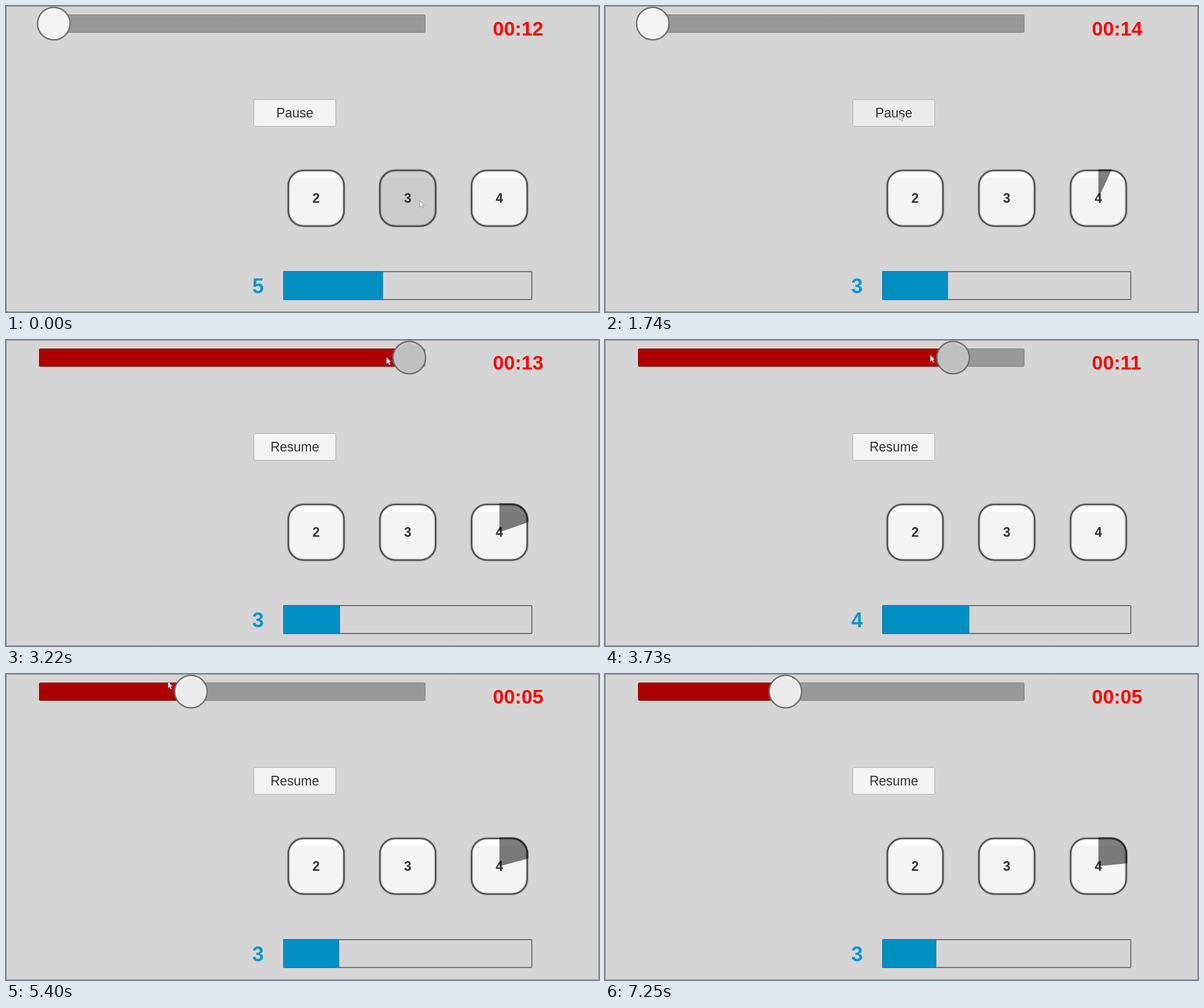
An HTML page with a canvas for the animation above (7530 ms loop, 1042 by 538 pixels).

```html
<!DOCTYPE html>
<html lang="en">
<head>
<meta charset="utf-8">
<title>Rewind slider</title>
<style>
html, body { margin: 0; width: 100%; height: 100%; overflow: hidden; background: #d5d5d5; }
canvas { display: block; }
</style>
</head>
<body>
<canvas id="stage" width="1042" height="538"></canvas>
<script>
const ctx = document.getElementById('stage').getContext('2d');
const LOOP = 7530, PAUSE_AT = 1840, GRAB_AT = 2700, DROP_AT = 5400, LEAVE_AT = 7250;
const START = 12.56, END = START + PAUSE_AT / 1000;   // game clock, seconds
const MIN_X = 84, MAX_X = 752;                        // travel of the slider handle
const FACE = '#f4f4f4', HOVER = '#ebebeb', PRESSED = '#c0c0c0', INK = '#323232';

const clamp = (v, lo, hi) => Math.min(hi, Math.max(lo, v));

function ease(t, from, to) {
  const k = clamp((t - from) / (to - from), 0, 1);
  return k * k * (3 - 2 * k);
}

// Slightly slowing drag to the left
function dragX(t) {
  const u = (t - 4430) / 1000;
  return clamp(486 - 174 * u + 8.4 * u * u, 317, MAX_X);
}

// Mana refills steadily; two cards are played on the way
const manaAt = s => 0.61 * s - (s >= 10.6 ? 2 : 0) - (s >= 12.7 ? 3 : 0);

function pointerAt(t) {
  let x = 727, y = 342;
  const moveTo = (tx, ty, from, to) => {
    const k = ease(t, from, to);
    x += (tx - x) * k;
    y += (ty - y) * k;
  };
  moveTo(517, 189, 500, 1600);
  moveTo(743, 19, 2000, 2560);
  moveTo(dragX(t) - 40, 21 - (Math.min(t, DROP_AT) - 4430) / 130, GRAB_AT, 3100);
  moveTo(203, 16, DROP_AT, 6120);
  moveTo(1000, 530, 6300, LEAVE_AT);
  return [x, y];
}

function box(x, y, w, h, r, fill, stroke, line = 1) {
  ctx.beginPath();
  ctx.roundRect(x, y, w, h, r);
  if (fill) { ctx.fillStyle = fill; ctx.fill(); }
  if (stroke) { ctx.strokeStyle = stroke; ctx.lineWidth = line; ctx.stroke(); }
}

function disc(x, y, r, fill, stroke, line) {
  box(x - r, y - r, 2 * r, 2 * r, r, fill, stroke, line);
}

function label(text, x, y, size, color, weight = 'bold', align = 'center') {
  ctx.font = `${weight} ${size}px "Liberation Sans", Arial, sans-serif`;
  ctx.textAlign = align;
  ctx.fillStyle = color;
  ctx.fillText(text, x, y);
}

function card(cost, x, face, mana) {
  const y = 287, size = 102, cx = x + size / 2, cy = y + size / 2;
  ctx.save();
  box(x, y, size, size, 29, face === PRESSED ? '#d1d1d1' : '#fff');
  ctx.clip();
  box(x + 3, y + 15, size - 6, size, 16, face === PRESSED ? '#cbcbcb' : face);
  ctx.restore();
  box(x + 2, y + 2, size - 4, size - 4, 27, null, 'rgba(90,90,90,.4)', 5);
  box(x + 2, y + 2, size - 4, size - 4, 27, null, '#434343', 2.2);
  label(cost, cx, 346, 23, INK);

  const missing = 1 - mana / cost;
  if (missing <= 0) return;
  ctx.save();
  ctx.beginPath();
  ctx.roundRect(x, y, size, size, 29);
  ctx.clip();
  ctx.beginPath();
  ctx.moveTo(cx, cy);
  ctx.arc(cx, cy, size, -Math.PI / 2, (2 * missing - 0.5) * Math.PI);
  ctx.fillStyle = 'rgba(0,0,0,.5)';
  ctx.fill();
  ctx.restore();
}

function slider(x, paused, face) {
  box(58.5, 15.5, 678, 31, 2, '#999', '#777');
  if (paused) box(58.5, 15.5, x - 58, 31, 2, '#ad0000', '#8c0000');
  ctx.save();
  disc(x, 31, 29, face === PRESSED ? '#c8c8c8' : '#fff');
  ctx.clip();
  disc(x, 36, 29, face);
  ctx.restore();
  disc(x, 31, 28.6, null, '#6e6e6e', 2.5);
}

function pointer(x, y) {
  ctx.save();
  ctx.translate(x, y);
  ctx.fillStyle = '#fff';
  ctx.strokeStyle = '#777';
  ctx.lineWidth = 0.8;
  const arrow = new Path2D('M0 0V11.5L2.6 9.2 4.6 13.4 6.4 12.6 4.5 8.4H8Z');
  ctx.fill(arrow);
  ctx.stroke(arrow);
  ctx.restore();
}

function draw(t) {
  const paused = t >= PAUSE_AT;
  const handleX = paused ? dragX(t) : MIN_X;
  const seconds = paused ? (handleX - MIN_X) / (MAX_X - MIN_X) * END : START + t / 1000;
  const mana = manaAt(seconds);
  const [px, py] = pointerAt(t);
  const over = (x, y, w, h) => px >= x && px <= x + w && py >= y && py <= y + h;

  box(0, 0, 1042, 538, 0, '#d5d5d5');
  box(0.5, 0.5, 1041, 537, 0, null, '#808080');

  const dragging = t >= GRAB_AT && t < DROP_AT;
  slider(handleX, paused, dragging ? PRESSED : t > 2400 ? HOVER : FACE);
  label('00:' + String(Math.floor(seconds)).padStart(2, '0'), 855.6, 52, 34.7, '#f00', 'bold', 'left');

  const lit = over(435, 164, 145, 48) || (paused && t < GRAB_AT);
  box(435.5, 164.5, 144, 47, 2.5, lit ? HOVER : FACE, '#acacac');
  label(paused ? 'Resume' : 'Pause', 507.5, 196, 23, INK, 'normal');

  for (let cost = 2; cost <= 4; cost++) {
    const x = 494 + 161 * (cost - 2);
    const hovered = t < DROP_AT && over(x, 287, 102, 102);
    card(cost, x, !hovered ? FACE : t < 140 ? PRESSED : HOVER, mana);
  }

  label(Math.floor(mana), 443, 504.5, 36.5, '#0d96cb');
  box(488, 467, 436, 49, 1, null, '#707070', 1.9);
  box(487.5, 466.5, mana * 30.9 - 0.5, 50, 1, '#0090c1', '#0079a3');

  if (t < LEAVE_AT) pointer(px, py);
}

function frame(now) {
  draw(now % LOOP);
  requestAnimationFrame(frame);
}
requestAnimationFrame(frame);
</script>
</body>
</html>
```
